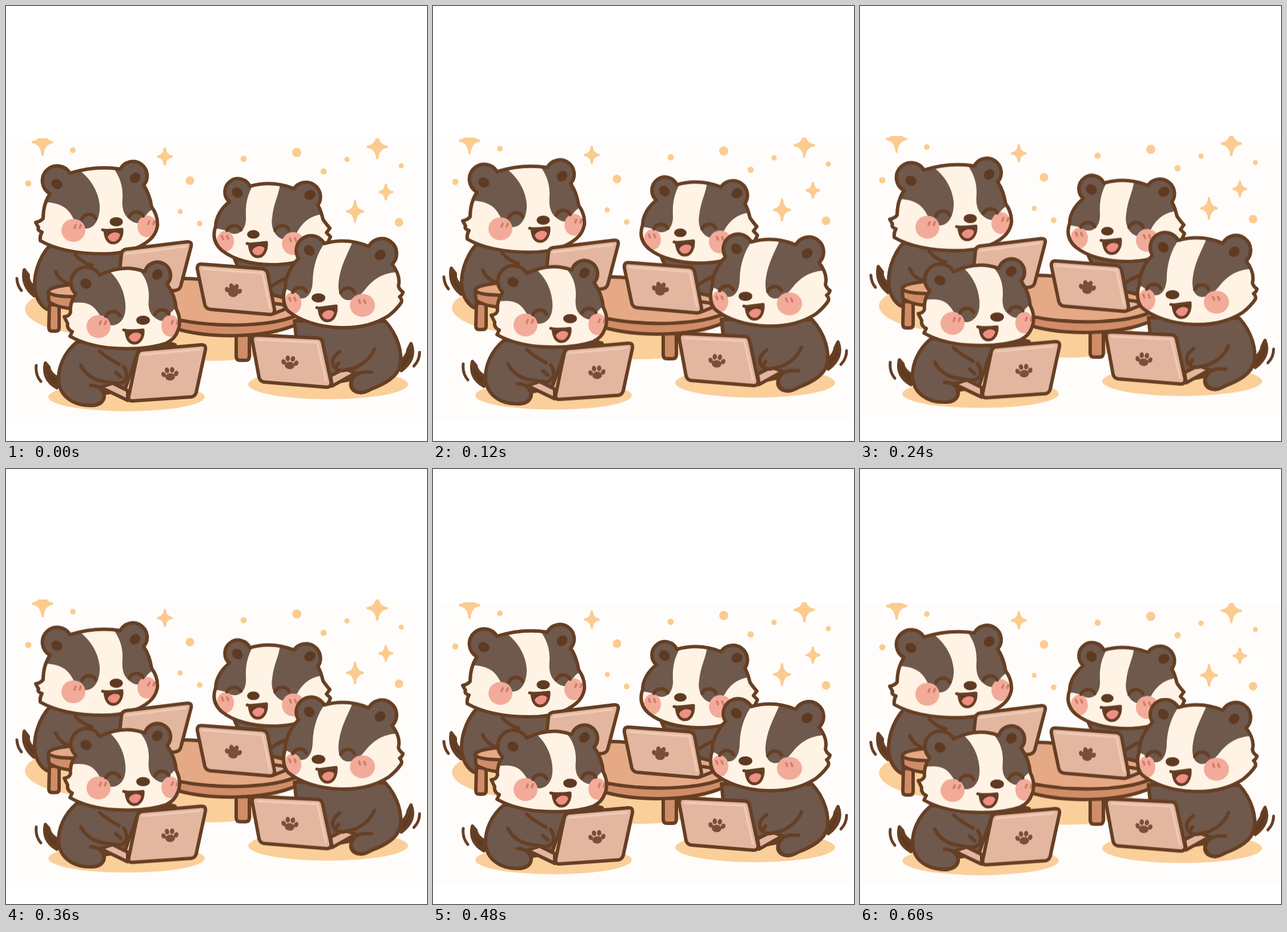
Animation of 737x760 px, one loop 0.72 s. Source, as an HTML page:

```html
<!DOCTYPE html>
<html lang="en">
<head>
<meta charset="utf-8">
<title>Badgers at work</title>
<style>
  html, body { margin: 0; width: 100%; height: 100%; overflow: hidden; background: #fff; }
  svg { display: block; width: 737px; height: 760px; }
  .ink { fill: none; stroke: #663f24; stroke-width: 6; stroke-linecap: round; stroke-linejoin: round; }
  .thin { stroke-width: 5; }
  .fur { fill: #6f584c; }
  .cream { fill: #fef3e5; }
  .dark { fill: #5f3a22; }
  .pad { fill: #784f3c; }
  .blush { fill: #f3ab99; }
  .mark { fill: none; stroke: #d07f69; stroke-width: 4; stroke-linecap: round; }
  .tongue { fill: #ef8e84; }
  .gold { fill: #fbcb8f; }
  .shade { fill: #fbcf9a; }
  .lid { fill: #e3b69f; }
  .shine { fill: none; stroke: #efcab5; stroke-width: 4; stroke-linecap: round; stroke-linejoin: round; }
  .wood { fill: #e5a986; }
  .edge { fill: #d08d68; }
  #art, #top, #foot { animation: bob .72s step-end infinite; }
  #top { animation-name: top; }
  #foot { animation-name: foot; }
  @keyframes bob {
    0%, 66.667% { transform: translateY(0); }
    16.667%, 50% { transform: translateY(-2.8px); }
    33.333% { transform: translateY(-5.6px); }
    83.333%, 100% { transform: translateY(1.5px); }
  }
  @keyframes top {
    0% { transform: translateY(231px); }
    16.667% { transform: translateY(230px); }
    33.333% { transform: translateY(227px); }
    50% { transform: translateY(228px); }
    66.667% { transform: translateY(233px); }
    83.333%, 100% { transform: translateY(234px); }
  }
  @keyframes foot {
    0%, 66.667% { transform: translateY(727px); }
    16.667% { transform: translateY(722px); }
    33.333% { transform: translateY(718px); }
    50% { transform: translateY(734px); }
    83.333%, 100% { transform: translateY(727px); }
  }
</style>
</head>
<body>
<svg viewBox="0 0 737 760" xmlns="http://www.w3.org/2000/svg">
  <rect y="220" width="737" height="520" fill="#fffdfb"/>
  <g id="art"></g>
  <rect id="top" y="-300" width="737" height="300" fill="#fff"/>
  <rect id="foot" width="737" height="100" fill="#fff"/>
</svg>
<script>
const path = (cls, d) => `<path class="${cls}" d="${d}"/>`;
const oval = (cls, x, y, rx, ry = rx, turn = 0) =>
  `<ellipse class="${cls}" cx="${x}" cy="${y}" rx="${rx}" ry="${ry}" transform="rotate(${turn} ${x} ${y})"/>`;
const shape = (fill, d) => path(fill, d) + path('ink', d);
const line = d => path('ink', d);

// Four-pointed sparkle with softly rounded tips
function star(x, y, w, h) {
  const a = w * .1, b = h * .1;
  return `<path d="M${x} ${y - h}Q${x + a} ${y - b} ${x + w} ${y}Q${x + a} ${y + b} ${x} ${y + h}` +
    `Q${x - a} ${y + b} ${x - w} ${y}Q${x - a} ${y - b} ${x} ${y - h}Z"
    fill="#fbcb8f" stroke="#fbcb8f" stroke-width="4" stroke-linejoin="round"/>`;
}

function paw(x, y, turn) {
  return `<g transform="translate(${x} ${y}) rotate(${turn})">` +
    oval('pad', 0, 5, 8.5, 6.5) + oval('pad', -11, 0, 3.8, 4.8, -25) +
    oval('pad', -4.5, -7, 3.8, 5, -8) + oval('pad', 4.5, -7, 3.8, 5, 8) +
    oval('pad', 11, 0, 3.8, 4.8, 25) + '</g>';
}

const eye = ([x, y]) => line(`M${x - 12} ${y + 7}C${x - 8} ${y - 3} ${x + 7} ${y - 4} ${x + 12} ${y + 6}`);

function cheek([x, y, rx, ry, lean]) {
  const tick = dx => path('mark', `M${x + dx + lean / 2} ${y - 9}L${x + dx - lean / 2} ${y - 4}`);
  return oval('blush', x, y, rx, ry) + tick(lean * 2 - 1) + tick(lean * 2 + 8);
}

function mouth([x, y, lean]) {
  const d = `M${x - 14} ${y}Q${x} ${y + 2 - lean} ${x + 16} ${y - lean}` +
    `C${x + 17} ${y + 12} ${x + 10} ${y + 22} ${x + 1} ${y + 22}C${x - 9} ${y + 22} ${x - 13} ${y + 12} ${x - 14} ${y}Z`;
  return path('dark', d) + oval('tongue', x + 2, y + 13, 12, 9, -20) + path('ink thin', d) +
    path('ink thin', `M${x - 18} ${y - 1}L${x - 14} ${y}`);
}

let count = 0;
function head(b) {
  const id = 'head' + count++;
  return `<clipPath id="${id}"><path d="${b.outline}"/></clipPath>` +
    `<g clip-path="url(#${id})">` + path('cream', b.outline) + b.patches.map(d => path('fur', d)).join('') +
    b.ears.map(([x, y, turn]) => oval('dark', x, y, 10, 8.5, turn)).join('') +
    b.cheeks.map(cheek).join('') + '</g>' + line(b.outline) +
    b.eyes.map(eye).join('') + oval('dark', ...b.nose) + mouth(b.mouth);
}

function laptop(d, shine) {
  return shape('lid', d) + path('shine', shine);
}

const topLeft = {
  outline: 'M77 328A26 26 0 1 1 112 292Q158 278 200 285A25 25 0 1 1 241 313C249 325 253 338 255 351C263 362 266 374 265 385Q262 400 251 409C230 427 200 433 170 433C125 433 88 426 60 410Q59 401 63 395Q54 392 57 387L52 378Q60 377 65 371C65 354 69 340 77 328Z',
  patches: ['M50 270L128 270L131 289C150 304 162 326 164 348C165 372 155 389 139 389C126 389 121 376 115 366C106 350 92 343 60 342Z',
    'M187 270L260 260L262 352C250 358 243 365 242 375Q235 382 224 378C208 370 202 358 204 335C205 315 199 297 187 282Z'],
  ears: [[89, 311, 25], [226, 300, -45]],
  cheeks: [[118, 392, 21, 20, 2], [247, 385, 17, 19, 2]],
  eyes: [[145, 365], [228, 361]], nose: [193, 377, 11.5, 8], mouth: [187, 392, 2]
};
const bottomLeft = {
  outline: 'M122 503A27 27 0 1 1 164 470Q205 450 243 464A23 23 0 1 1 282 486C292 500 297 515 298 529C305 542 306 557 300 569Q296 581 281 589C255 598 220 600 190 598C160 596 135 590 112 577L116 569Q106 564 108 555L102 543Q111 542 113 535C112 525 115 513 122 503Z',
  patches: ['M100 440L176 440L177 460C195 474 207 495 209 520C211 545 200 557 186 558C174 558 168 545 160 534C150 519 137 515 105 520Z',
    'M230 440L300 435L304 524C292 530 285 538 284 545Q277 553 268 549C252 541 248 531 250 510C251 488 243 470 230 459Z'],
  ears: [[140, 485, 25], [265, 469, -45]],
  cheeks: [[162, 560, 21, 20, 2], [288, 559, 16, 19, 2]],
  eyes: [[187, 535], [273, 532]], nose: [240, 549, 12, 8], mouth: [224, 567, 1]
};
const topRight = {
  outline: 'M391 342A23 23 0 1 1 427 315Q465 304 504 319A25 25 0 1 1 546 348C552 358 553 366 555 373Q562 383 567 388L561 396L568 403Q560 425 535 438C510 449 490 452 465 452C430 452 398 443 378 427C363 414 362 399 367 385C367 369 377 353 391 342Z',
  patches: ['M360 290L437 290L433 312C422 330 419 348 420 368C421 386 413 398 400 398C389 398 386 387 355 389Z',
    'M480 295L570 290L562 363C535 364 522 376 512 391C505 404 495 409 483 407C470 402 463 387 466 369C468 345 478 330 480 310Z'],
  ears: [[405, 326, 40], [532, 330, -25]],
  cheeks: [[384, 411, 15, 18, -2], [503, 415, 20, 20, -2]],
  eyes: [[399, 385], [483, 385]], nose: [433, 399, 11, 7.5], mouth: [440, 416, 3]
};
const bottomRight = {
  outline: 'M512 441A26 26 0 1 1 557 415Q597 404 635 420A26 26 0 1 1 676 451C686 464 690 477 687 489Q688 495 695 500Q694 505 689 508Q694 513 692 518Q684 530 670 541C645 557 615 563 585 562C545 561 512 548 494 533C486 524 483 508 489 492C488 478 497 456 512 441Z',
  patches: ['M480 390L568 390L559 413C545 430 538 455 537 477C537 498 530 511 517 511C505 511 508 496 475 490Z',
    'M607 400L690 390L700 465C665 463 648 474 633 490C622 504 612 514 598 514C583 512 580 496 583 477C587 450 600 430 607 411Z'],
  ears: [[531, 427, 40], [655, 435, -35]],
  cheeks: [[502, 519, 15, 19, -2], [624, 523, 22, 20, -2]],
  eyes: [[514, 493], [598, 494]], nose: [547, 510, 12, 8], mouth: [562, 528, 4]
};

const dots = [[117, 252, 5], [39, 310, 5.5], [322, 305, 7.5], [305, 359, 4.5], [339, 380, 5], [416, 267, 5.5],
  [509, 256, 8], [556, 289, 5.5], [597, 268, 4.7], [692, 279, 4.5], [688, 378, 7.5]];
const stars = [[64, 238, 17, 22], [278, 263, 12, 14], [650, 246, 17, 20], [665, 325, 11, 13], [611, 359, 14, 18]];

const scene = [
  ...dots.map(d => oval('gold', ...d)),
  ...stars.map(s => star(...s)),
  oval('shade', 150, 535, 117, 40, 3), oval('shade', 365, 580, 115, 40),
  oval('shade', 211, 683, 137, 25), oval('shade', 564, 661, 140, 26),

  // back left
  path('ink thin', 'M19 476Q20 489 27 497'),
  shape('dark', 'M32 461Q27 488 49 506L51 493Q37 482 39 470Z'),
  shape('fur', 'M77 418C56 440 47 474 51 498Q56 521 72 530L215 500L215 422Z'),
  line('M87 464Q93 480 111 486M121 434Q132 448 150 453'),
  head(topLeft),

  // back right
  shape('fur', 'M400 442L540 430L515 520L440 530Z'),
  line('M466 489Q480 478 500 473'),
  head(topRight),

  // table
  shape('edge', 'M76 522H93V562Q93 568 87 568H81Q75 568 75 562Z'),
  shape('edge', 'M403 570H426V612Q426 619 419 619H410Q403 619 403 612Z'),
  shape('edge', 'M74 499L75 516Q84 525 115 529L295 563C350 580 450 583 512 555L515 535Z'),
  shape('wood', 'M74 499C77 489 112 487 150 484L310 476Q340 476 380 483L520 518L514 538C470 561 370 563 295 547L115 508Q76 507 74 499Z'),

  // back laptops
  laptop('M210 425L317 412Q326 411 324 420L306 489Q304 496 296 497L205 503Q194 502 196 492L202 434Q203 426 210 425Z', 'M211 433L314 420'),
  shape('lid', 'M466 519L486 522L490 529L470 537Z'),
  laptop('M343 451L449 459Q456 460 458 467L470 530Q471 539 462 539L358 530Q350 529 348 522L335 460Q334 450 343 451Z', 'M344 459L449 467L462 528'),
  paw(398, 497, 8), oval('pad', 398, 497, 9, 9),

  // front left
  path('ink thin', 'M53 628Q51 644 61 656'),
  shape('dark', 'M69 624Q63 652 89 667L92 651Q76 642 75 631Z'),
  shape('fur', 'M124 587C101 606 91 632 92 654C94 681 116 698 149 698C166 698 174 688 171 677L208 671L232 602L296 592L270 585Z'),
  shape('lid', 'M165 666L187 659L213 672L213 689Z'),
  path('fur', 'M140 630L200 625L212 655L190 660L155 662Z'),
  line('M131 628Q142 649 166 655L191 659Q207 662 211 648Q212 638 206 630M164 603Q174 613 198 626M192 640L201 648M148 663Q168 663 172 681Q171 697 149 698'),
  head(bottomLeft),
  laptop('M238 601L341 592Q351 591 349 601L333 675Q331 682 324 683L221 690Q213 690 215 681L230 609Q232 602 238 601Z', 'M239 609L339 600'),
  paw(287, 643, -5),

  // front right
  path('ink thin', 'M724 605Q724 619 714 629'),
  shape('dark', 'M709 590Q719 616 692 637L691 621Q703 611 704 600Z'),
  shape('fur', 'M664 551C687 576 694 607 690 628C685 648 664 660 640 669Q622 680 609 672Q600 664 606 652L565 660L510 600L505 550Z'),
  shape('lid', 'M568 646L592 634L612 641L571 664Z'),
  path('fur', 'M560 595L636 612L612 636L585 640L570 635Z'),
  line('M645 599Q637 620 611 632L590 637Q571 636 572 620Q574 611 584 604M582 624L577 631M640 640Q608 636 604 659Q607 677 625 675'),
  head(bottomRight),
  laptop('M440 575L545 580Q552 580 554 587L569 657Q570 666 561 666L452 657Q445 656 443 649L431 584Q430 575 440 575Z', 'M441 583L545 588L560 655'),
  paw(497, 623, 6)
];
document.getElementById('art').innerHTML = scene.join('');
</script>
</body>
</html>
```
